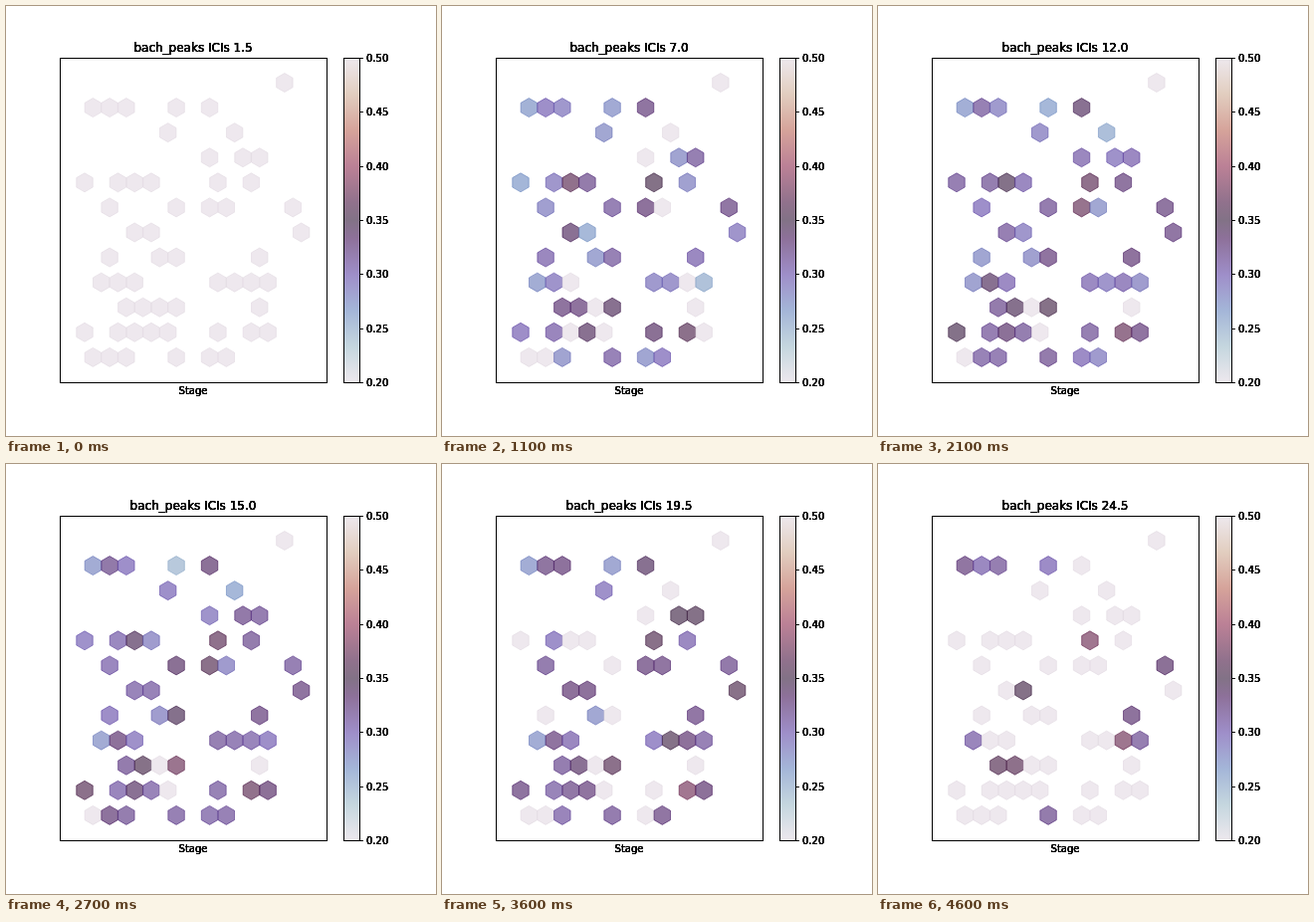
Write an HTML page with a canvas that moves like this. It is 432 px wide and 432 px high and loops after 5.1 s.

```html
<!DOCTYPE html>
<html lang="en">
<head>
<meta charset="utf-8">
<title>Hexagon map</title>
<style>
  html, body { margin: 0; width: 100%; height: 100%; overflow: hidden; background: #fff; }
  canvas { display: block; }
</style>
</head>
<body>
<canvas id="stage" width="432" height="432"></canvas>
<script>
const ctx = document.getElementById('stage').getContext('2d');
const LOOP = 5100, STEP = 100, LAST = 46;
const OFF = 20, MAX = 50, ALPHA = 0.6;
const TOP = 52.5, HEIGHT = 326;

// Cyclic colour scale: [position, r, g, b]
const scale = ['e2d9e2', '9ebbc9', '6785be', '5e43a5', '421257',
  '471340', '8e2c50', 'ba6657', 'ceac94', 'e2d9e2']
  .map((hex, i) => [i / 9, ...hex.match(/../g).map(h => parseInt(h, 16))]);
scale.splice(5, 0, [0.5, 47, 20, 54]);

// Staggered grid: o = lit for a while, * = lit to the end, - = never lit
const layout = [
  '............-',
  '***..*.o',
  '.....o...o',
  '.......o.oo',
  'o.ooo...*.o',
  '.o...o.oo...*',
  '...o*........o',
  '.o..oo....*',
  '.*oo....oo**',
  '..**-o....-',
  'o.ooo-..o.oo',
  '-oo..*.oo'
];

function random(a, b) {
  const s = Math.sin(a * 12.9898 + b * 78.233) * 43758.5453;
  return s - Math.floor(s);
}

const cells = layout.flatMap((row, r) => [...row].map((kind, k) => ({
  kind,
  seed: r * 14 + k,
  x: 79 + 16.74 * (k + r % 2 / 2),
  y: 77 + 25.08 * r
}))).filter(cell => cell.kind !== '.');

for (const cell of cells) {
  cell.on = 1 + 12 * random(cell.seed, 1) ** 2;
  cell.off = cell.kind === '*' ? Infinity : LAST - 18 * random(cell.seed, 2) ** 2;
  cell.base = 29 + 8 * (random(cell.seed, 3) - 0.5);
}

function color(u) {
  const i = Math.max(1, scale.findIndex(s => s[0] >= u));
  const [p, ...a] = scale[i - 1], [q, ...b] = scale[i];
  const f = (u - p) / (q - p);
  return `rgb(${a.map((v, k) => Math.round(v + (b[k] - v) * f))})`;
}

// Smooth random walk between knots eight steps apart
function wander(seed, step) {
  const n = Math.floor(step / 8), f = step / 8 - n;
  return random(seed, 10 + n) * (1 - f) + random(seed, 11 + n) * f - 0.5;
}

function levelAt({ kind, seed, on, off, base }, step) {
  if (kind === '-' || step < on || step >= off) return OFF;
  return base + 0.1 * step + 8 * wander(seed, step);
}

function hexagon({ x, y }, fill) {
  ctx.beginPath();
  for (let k = 0; k < 6; k++) {
    const a = k * Math.PI / 3;
    ctx.lineTo(x + 9.5 * Math.sin(a), y - 9.5 * Math.cos(a));
  }
  ctx.closePath();
  ctx.fillStyle = ctx.strokeStyle = fill;
  ctx.fill();
  ctx.stroke();
}

// Repeated passes give the heavy edges of the lettering
function label(text, x, y, size, align) {
  ctx.font = `${size}px "DejaVu Sans", sans-serif`;
  ctx.textAlign = align;
  ctx.fillStyle = '#000';
  for (let k = 0; k < 6; k++) ctx.fillText(text, x, y);
}

function colorbar() {
  const gradient = ctx.createLinearGradient(0, TOP + HEIGHT, 0, TOP);
  for (let k = 0; k <= 90; k++) gradient.addColorStop(k / 90, color(k / 90));
  ctx.globalAlpha = ALPHA;
  ctx.fillStyle = gradient;
  ctx.fillRect(339.5, TOP, 16, HEIGHT);
  ctx.globalAlpha = 1;
  ctx.strokeRect(339.5, TOP, 16, HEIGHT);
  for (let k = 0; k <= 6; k++) {
    const y = Math.round(TOP + HEIGHT * (1 - k / 6) - 0.5);
    ctx.fillStyle = '#000';
    ctx.fillRect(356, y, 3, 1);
    label((0.2 + k * 0.05).toFixed(2), 362, y + 4, 10, 'left');
  }
}

function draw(step) {
  ctx.fillStyle = '#fff';
  ctx.fillRect(0, 0, 432, 432);
  ctx.globalAlpha = ALPHA;
  ctx.lineWidth = 1;
  for (const cell of cells)
    hexagon(cell, color((levelAt(cell, step) - OFF) / (MAX - OFF)));
  ctx.globalAlpha = 1;
  ctx.strokeStyle = '#000';
  ctx.strokeRect(54.5, TOP, 268, HEIGHT);
  colorbar();
  label(`bach_peaks ICIs ${(1.5 + step / 2).toFixed(1)}`, 188, 46, 12, 'center');
  label('Stage', 188, 390, 10, 'center');
}

const start = performance.now();
function tick() {
  const t = (performance.now() - start) % LOOP;
  draw(Math.min(LAST, Math.floor(t / STEP)));
  requestAnimationFrame(tick);
}
tick();
</script>
</body>
</html>
```
